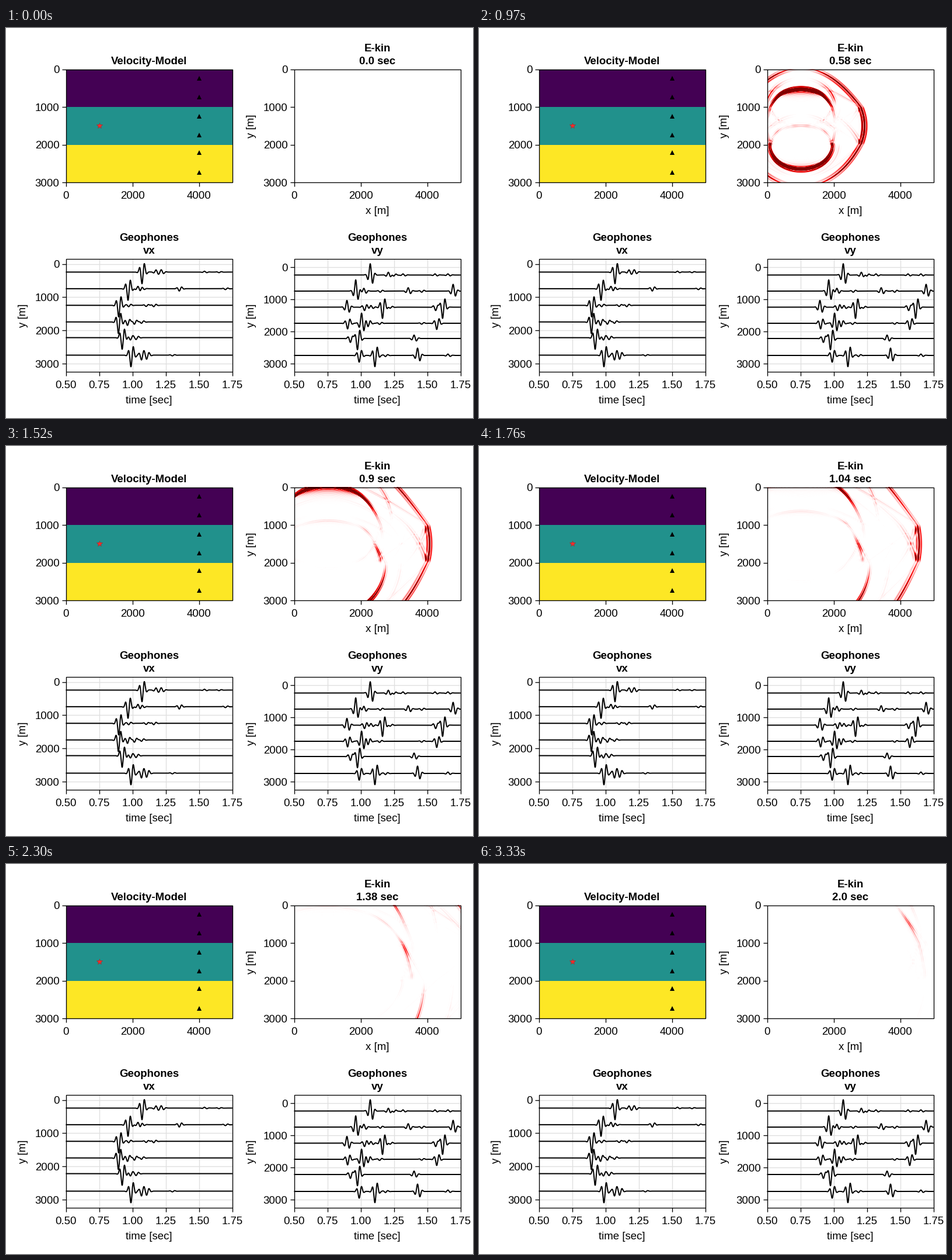
Write a matplotlib script that moves like this. It is 800 by 667 pixels and loops after 3.36 s.

```python
import matplotlib.pyplot as plt
import numpy as np
from matplotlib.animation import FuncAnimation
from matplotlib.colors import LinearSegmentedColormap
from matplotlib.patches import Rectangle

PX = 0.72  # points per pixel at 100 dpi
EM = 18.67
STEPS, SLOTS, SLOT_MS = 101, 112, 30
PHONES = [245, 745, 1245, 1745, 2218, 2745]

# ---- elastic wave simulation in km and s ----
H, DT, PAD = 0.0125, 0.002, 40
ROWS, COLS = 240, 400
C1, C2 = 9 / 8 * DT / H, -DT / H / 24
INNER = (slice(2, -2), slice(2, -2))


def stiffness():
    """Columns of c11, c13, c33, c55 for three layered media."""
    vp = np.array([2.80, 2.90, 3.05])
    vs = np.array([1.80, 1.93, 2.40])
    eps = np.array([0.0, 0.245, 0.065])
    delta = np.array([0.0, 0.10, 0.05])
    c33, c55 = vp**2, vs**2
    c11 = c33 * (1 + 2 * eps)
    gap = c33 - c55
    c13 = np.sqrt(2 * delta * c33 * gap + gap**2) - c55
    layer = np.clip((np.arange(ROWS + 2 * PAD) - PAD) // (ROWS // 3), 0, 2)[2:-2]
    return [c[layer, None].astype(np.float32) for c in (c11, c13, c33, c55)]


def diff(f, axis, s):
    """Fourth order staggered difference: s=1 forward, s=0 backward."""
    def at(k):
        cut = list(INNER)
        cut[axis] = slice(2 + k, f.shape[axis] - 2 + k)
        return f[tuple(cut)]
    d = at(s) - at(s - 1)
    d *= np.float32(C1)
    far = at(s + 1) - at(s - 2)
    far *= np.float32(C2)
    d += far
    return d


def sponge(n):
    i = np.arange(n)
    depth = np.maximum(0, PAD - np.minimum(i, n - 1 - i))
    return np.exp(-(0.0075 * depth) ** 2)


def ricker(t, freq=20, delay=0.05):
    a = (np.pi * freq * (t - delay)) ** 2
    return (1 - 2 * a) * np.exp(-a)


def simulate():
    shape = (ROWS + 2 * PAD, COLS + 2 * PAD)
    vx, vz, sxx, szz, sxz = fields = [np.zeros(shape, np.float32) for _ in range(5)]
    c11, c13, c33, c55 = stiffness()
    damp = np.outer(sponge(shape[0]), sponge(shape[1])).astype(np.float32)
    src = (PAD + ROWS // 2, PAD + COLS // 5)
    view = (slice(PAD, PAD + ROWS), slice(PAD, PAD + COLS))
    shots = [np.zeros((ROWS, COLS), np.float32)]
    for n in range(1, 10 * (STEPS - 1) + 1):
        vx[INNER] += diff(sxx, 1, 1) + diff(sxz, 0, 0)
        vz[INNER] += diff(sxz, 1, 0) + diff(szz, 0, 1)
        vx[src] += ricker(n * DT)
        ex, ez = diff(vx, 1, 0), diff(vz, 0, 0)
        sxx[INNER] += c11 * ex + c13 * ez
        szz[INNER] += c13 * ex + c33 * ez
        sxz[INNER] += c55 * (diff(vx, 0, 1) + diff(vz, 1, 1))
        for f in fields:
            f *= damp
        if n % 10 == 0:
            shots.append(vx[view] ** 2 + vz[view] ** 2)
    return shots


# ---- geophone traces: (arrival in ms, amplitude) per phone ----
VX = [
    [(1071, 1), (1176, -.18), (1216, -.18), (1540, -.07), (1649, .05)],
    [(966, 1), (1041, -.2), (1071, -.1), (1351, .2), (1697, .08)],
    [(896, 1), (971, .12), (1102, .1), (1159, .12)],
    [(894, 1), (962, .3), (1014, .2), (1067, .12)],
    [(922, 1), (984, .2), (1027, .15)],
    [(988, 1), (1067, .4), (1106, .3), (1299, .06)],
]
VY = [
    [(1071, -1), (1207, -.25), (1246, .12), (1317, -.1), (1557, -.1), (1654, -.1)],
    [(962, -1), (1023, -.25), (1146, .1), (1356, -.3), (1457, .1), (1693, -.6)],
    [(896, -.6), (1028, .3), (1076, -.15), (1163, 1), (1220, .1), (1562, .3), (1614, 1)],
    [(901, .5), (1006, -.9), (1054, .3), (1141, .1), (1457, .08), (1570, .55)],
    [(922, .35), (975, 1), (1400, -.3)],
    [(988, .6), (1106, 1), (1185, .1), (1426, -.65), (1654, -.12)],
]


def wavelet(u):
    return 1.04 * np.cos(2 * np.pi * 25 * u) * np.exp(-((u - 0.0049) / 0.0238) ** 2)


# ---- drawing, all in stage pixels ----
W, HT = 285.3, 193.5
LEFT, RIGHT, TOP, LOW = 102.5, 493.5, 70.5, 394.5

plt.rcParams["font.family"] = "Liberation Sans"
fig = plt.figure(figsize=(8, 6.67), dpi=100, facecolor="white")
ax = fig.add_axes([0, 0, 1, 1])
ax.set_axis_off()


def text(x, y, s, ha="center", **kw):
    return ax.text(x, y, s, ha=ha, va="baseline", fontsize=EM * PX, color="black", **kw)


def line(xs, ys, width=1.33, color="black", z=5):
    ax.plot(xs, ys, color=color, lw=width * PX, zorder=z, solid_capstyle="butt")


def titles(x, y, *rows):
    n = len(rows)
    return [text(x + W / 2, y - 9 - 22 * (n - 1 - i), s, weight="bold")
            for i, s in enumerate(rows)]


def frame(x, y, xticks, yticks, grid=False):
    """Box with ticks; each tick is (pixel position, label)."""
    bottom = y + HT
    for px, label in xticks:
        line([px, px], [bottom, bottom + 6.67])
        text(px, bottom + 28.5, label)
        if grid:
            line([px, px], [y, bottom], color="#dfdfdf", z=1)
    for py, label in yticks:
        line([x - 6.67, x], [py, py])
        text(x - 11, py + 6.6, label, ha="right")
        if grid:
            line([x, x + W], [py, py], color="#dfdfdf", z=1)
    ax.add_patch(Rectangle((x, y), W, HT, fill=False, ec="black", lw=1.33 * PX, zorder=6))


def ylabel(x, y):
    ax.text(x - 64.5, y + HT / 2, "y [m]", rotation=90, ha="right", va="center",
            fontsize=EM * PX, rotation_mode="default")


def map_panel(x):
    frame(x, TOP, [(x + W * m / 5000, str(m)) for m in (0, 2000, 4000)],
          [(TOP + HT * m / 3000, str(m)) for m in (0, 1000, 2000, 3000)])


def trace_panel(x, name, zero, arrivals):
    scale = (574 - zero) / 3000
    frame(x, LOW, [(x + W * i / 5, f"{0.5 + i / 4:.2f}") for i in range(6)],
          [(zero + scale * m, str(m)) for m in (0, 1000, 2000, 3000)], grid=True)
    titles(x, LOW, "Geophones", name)
    ylabel(x, LOW)
    text(x + W / 2, 641.5, "time [sec]")
    t = np.linspace(0.5, 1.75, 900)
    for depth, hits in zip(PHONES, arrivals):
        v = sum(a * wavelet(t - ms / 1000) for ms, a in hits)
        line(x + W * (t - 0.5) / 1.25, zero + scale * (depth + 350 * v), width=2, z=4)


# velocity model
for i, color in enumerate(("#440154", "#21918c", "#fde725")):
    ax.add_patch(Rectangle((LEFT, TOP + i * HT / 3), W, HT / 3, fc=color, lw=0, zorder=2))
map_panel(LEFT)
titles(LEFT, TOP, "Velocity-Model")
ax.plot(LEFT + W / 5, TOP + HT / 2, "*", ms=10 * PX, mfc="#ff2a2a", mec="#a02828",
        mew=0.4, zorder=4)
ax.plot([LEFT + W * 0.8] * 6, [TOP + HT * d / 3000 - 0.3 for d in PHONES], "^",
        ms=8 * PX, color="black", mew=0, zorder=4)

# kinetic energy
shots = simulate()
peak = shots[45][112:128, 304:344].max()
heat = LinearSegmentedColormap.from_list("heat", ["white", "red", "#800000"])
energy = ax.imshow(shots[0], cmap=heat, vmin=0, vmax=0.5 * peak, aspect="auto",
                   extent=(RIGHT, RIGHT + W, TOP + HT, TOP), zorder=2)
map_panel(RIGHT)
clock = titles(RIGHT, TOP, "E-kin", "0.0 sec")[1]
ylabel(RIGHT, TOP)
text(RIGHT + W / 2, 318, "x [m]")

# geophones
trace_panel(LEFT, "vx", 403.5, VX)
trace_panel(RIGHT, "vy", 409, VY)

ax.set_xlim(0, 800)
ax.set_ylim(667, 0)


def update(slot):
    k = min(STEPS - 1, int(slot * STEPS / SLOTS + 0.5))
    energy.set_data(shots[k])
    clock.set_text(f"{round(k * 0.02, 2)} sec")
    return energy, clock


anim = FuncAnimation(fig, update, frames=SLOTS, interval=SLOT_MS, repeat=True,
                     repeat_delay=0, blit=False)
plt.show()
```
